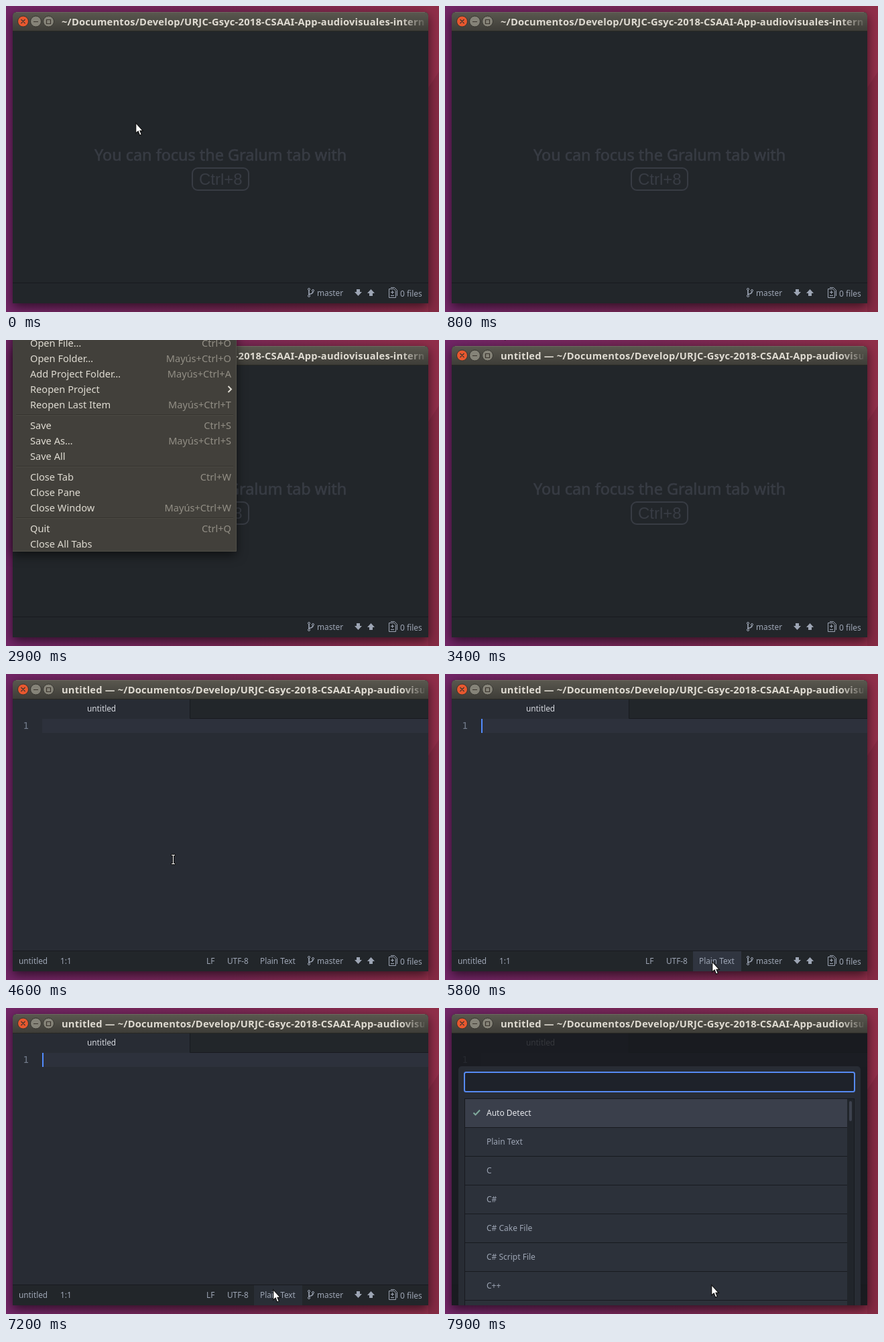
An HTML page for the animation above (8 s loop, 646 by 457 pixels).

```html
<!DOCTYPE html>
<html lang="en">
<head>
<meta charset="utf-8">
<title>New file and grammar selector</title>
<style>
html, body { margin: 0; width: 100%; height: 100%; overflow: hidden; background: #5d1f4c; }
svg { display: block; width: 100vw; height: 100vh; font: 11.8px "Noto Sans", "Open Sans", sans-serif; }
text { white-space: pre; }
.title { font-size: 14.7px; font-weight: 700; letter-spacing: .22px; fill: url(#titleFade); }
.menu { font-size: 14.6px; fill: #dfdbd2; }
.menu .keys { fill: #928e85; text-anchor: end; }
.status { fill: #9da5b4; }
.rows { font-size: 12px; fill: #9da5b4; }

/* One loop is 8 s, so 1.25% is a tenth of a second. */
.anim { animation: 8s step-end infinite; }
#menu { animation-name: menu; }
#pathTitle { animation-name: early; }
#fileTitle { animation-name: late; }
#welcome { animation-name: welcome; }
#editor { animation-name: editor; }
#caret { animation-name: caret; }
#hover { animation-name: hover; }
#dim { animation-name: dim; }
#panel { animation-name: panel; }
#pointer { animation-name: travel; }
#arrow { animation-name: arrow; }
#beam { animation-name: beam; }

@keyframes menu { 0%, 42.5% { visibility: hidden } 21.25% { visibility: visible } }
@keyframes early { 0% { visibility: visible } 42.5%, 100% { visibility: hidden } }
@keyframes late { 0% { visibility: hidden } 42.5%, 100% { visibility: visible } }
@keyframes welcome { 0% { visibility: visible } 43.75%, 100% { visibility: hidden } }
@keyframes editor { 0% { visibility: hidden } 43.75%, 100% { visibility: visible } }
@keyframes caret {
  0%, 47.5%, 57.5%, 67.5%, 77.5%, 87.5%, 92.5%, 100% { visibility: hidden }
  43.75%, 52.5%, 62.5%, 72.5%, 82.5%, 90% { visibility: visible }
}
@keyframes hover {
  0% { fill: transparent }
  65% { fill: #303540 }
  90%, 100% { fill: #292e36 }
}
@keyframes dim {
  0% { opacity: 0 }
  92.5% { opacity: 0; animation-timing-function: steps(4, start) }
  97.5%, 100% { opacity: .85 }
}
@keyframes panel {
  0% { opacity: 0 }
  92.5% { opacity: 0; animation-timing-function: steps(2, start) }
  95%, 100% { opacity: 1 }
}
@keyframes arrow { 0%, 65%, 100% { visibility: visible } 52.5% { visibility: hidden } }
@keyframes beam { 0%, 65%, 100% { visibility: hidden } 52.5% { visibility: visible } }
@keyframes travel {
  0% { transform: translate(194px, 175px) }
  3.75% { transform: translate(194px, 175px); animation-timing-function: steps(6, start) }
  11.25% { transform: translate(100px, -20px) }
  31.25% { transform: translate(60px, -11px); animation-timing-function: steps(5, start) }
  37.5% { transform: translate(84px, -18px) }
  50% { transform: translate(84px, -18px); animation-timing-function: steps(7, start) }
  58.75% { transform: translate(249px, 277px); animation-timing-function: steps(2, start) }
  61.25% { transform: translate(332px, 384px); animation-timing-function: steps(6, start) }
  68.75% { transform: translate(395px, 434px) }
  70% { transform: translate(395px, 434px); animation-timing-function: steps(3, start) }
  73.75% { transform: translate(399px, 430px); animation-timing-function: steps(3, start) }
  77.5% { transform: translate(404px, 437px); animation-timing-function: steps(3, start) }
  81.25% { transform: translate(409px, 429px); animation-timing-function: steps(4, start) }
  86.25% { transform: translate(401px, 421px) }
  87.5% { transform: translate(399px, 421px) }
  98.75%, 100% { transform: translate(398px, 414px) }
}
</style>
</head>
<body>
<svg viewBox="0 0 646 457" preserveAspectRatio="none">
  <defs>
    <linearGradient id="desktop">
      <stop stop-color="#712566"/><stop offset=".5" stop-color="#772754"/><stop offset="1" stop-color="#902e49"/>
    </linearGradient>
    <linearGradient id="bar" x2="0" y2="1">
      <stop stop-color="#5a584f"/><stop offset="1" stop-color="#3e3d38"/>
    </linearGradient>
    <linearGradient id="titleFade" gradientUnits="userSpaceOnUse" x1="588" x2="626" y1="0" y2="0">
      <stop stop-color="#dfdbd2"/><stop offset="1" stop-color="#dfdbd2" stop-opacity=".08"/>
    </linearGradient>
    <filter id="shadow" x="-20%" y="-20%" width="140%" height="140%">
      <feDropShadow dx="0" dy="5" stdDeviation="8" flood-opacity=".6"/>
    </filter>
    <clipPath id="window"><path d="M10 37H630V444H10Z"/></clipPath>
    <clipPath id="titleArea"><path d="M80 10H624V37H80Z"/></clipPath>
  </defs>

  <rect width="646" height="457" fill="url(#desktop)"/>
  <path d="M630 122L646 98V457H630Z" opacity=".08"/>
  <path d="M10 444V15Q10 9 16 9H624Q630 9 630 15V444Z" fill="#21252b" filter="url(#shadow)"/>

  <path d="M10 37V15Q10 9 16 9H624Q630 9 630 15V37Z" fill="url(#bar)"/>
  <path d="M15 9.5H625" stroke="#6b695f"/>
  <path d="M10 37.5H630" stroke="#282823"/>
  <g stroke="#34332e">
    <circle cx="25.500" cy="23" r="8" fill="#e8582f"/>
    <circle cx="44.500" cy="23" r="8" fill="#858378"/>
    <circle cx="63.500" cy="23" r="8" fill="#858378"/>
    <path d="M22.500 20L28.500 26M28.500 20L22.500 26M41 23.500H48M60.500 20.500H66.500V26.500H60.500Z" fill="none" stroke="#3a342e" stroke-width="1.200"/>
  </g>
  <g class="title" clip-path="url(#titleArea)">
    <text id="pathTitle" class="anim" x="83" y="29">~/Documentos/Develop/URJC-Gsyc-2018-CSAAI-App-audiovisuales-internet</text>
    <text id="fileTitle" class="anim" x="83" y="29">untitled — ~/Documentos/Develop/URJC-Gsyc-2018-CSAAI-App-audiovisuales</text>
  </g>

  <g id="welcome" class="anim" fill="#383c44" stroke="#383c44">
    <text x="132" y="231" font-size="23.400" font-weight="500" stroke-width=".6">You can focus the Gralum tab with</text>
    <rect x="278" y="242" width="84" height="33" rx="8" fill="none" stroke-width="2"/>
    <text x="288" y="267" font-size="24" font-family="Liberation Sans, Arial, sans-serif" stroke="none">Ctrl+8</text>
  </g>

  <path d="M10 413.500H630" stroke="#181a1f"/>

  <g id="editor" class="anim">
    <path d="M10 38H274V67H630V413H10Z" fill="#282c34"/>
    <path d="M274.500 38V66.500H630" fill="none" stroke="#181a1f"/>
    <path d="M54 67H630V88H54Z" fill="#2d313c"/>
    <text x="121" y="56" fill="#d7dae0">untitled</text>
    <text x="25.500" y="82" fill="#737c8c" font-size="14" font-family="DejaVu Sans Mono, monospace">1</text>
    <path id="caret" class="anim" d="M54 67H56V88H54Z" fill="#528bff"/>
    <path id="hover" class="anim" d="M370 414H442V444H370Z" fill="transparent"/>
    <g class="status">
      <text x="19" y="433">untitled</text>
      <text x="81" y="433">1:1</text>
      <text x="299" y="433">LF</text>
      <text x="330" y="433">UTF-8</text>
      <text x="379" y="433">Plain Text</text>
    </g>
  </g>

  <g class="status">
    <g fill="none" stroke="#9da5b4">
      <circle cx="452" cy="423" r="1.500"/><circle cx="452" cy="433" r="1.500"/><circle cx="458" cy="425" r="1.500"/>
      <path d="M452 424.500V431.500M458 426.500Q458 429.500 452.500 430.500" stroke-width="1.600"/>
      <path d="M571.500 422.500H578.500L581.500 425.500V435.500H571.500ZM574 420.500H579.500L583.500 424.500V433M576.500 425V430M574 427.500H579M574 432.500H579"/>
    </g>
    <path d="M523 423H528V427H531L525.500 433L520 427H523ZM542 433H547V429H550L544.500 423L539 429H542Z"/>
    <text x="464" y="433">master</text>
    <text x="588" y="434" font-size="12">0 files</text>
  </g>

  <g clip-path="url(#window)">
    <path id="dim" class="anim" d="M10 38H630V444H10Z" fill="#181a1f"/>
    <g id="panel" class="anim">
      <rect x="20" y="87" width="600" height="380" rx="5" fill="#282c34"/>
      <rect x="29" y="96" width="582" height="29" rx="2.500" fill="#1e222a" stroke="#568af2" stroke-width="2"/>
      <path d="M29 135H611V444H29Z" fill="#181a1f"/>
      <path d="M600 136H610V444H600Z" fill="#21252b"/>
      <rect x="603" y="139" width="4" height="30" rx="2" fill="#3d424e"/>
      <g id="rows" class="rows"></g>
      <path d="M42.500 156.500L45.500 159.500L52 152.500" fill="none" stroke="#7fa99b" stroke-width="2"/>
    </g>
  </g>

  <g id="menu" class="anim menu">
    <path d="M10 -30H343V316H10Z" fill="#42413b" filter="url(#shadow)"/>
    <path d="M343.500 0V315.500H10" fill="none" stroke="#504e47"/>
    <path d="M15 111.500H339M15 188.500H339M15 265.500H339" stroke="#35342f"/>
    <path d="M15 112.500H339M15 189.500H339M15 266.500H339" stroke="#4c4a43"/>
    <path d="M331.500 69L336 73.500L331.500 78" fill="none" stroke="#dfdbd2" stroke-width="2"/>
  </g>

  <g id="pointer" class="anim">
    <path id="arrow" class="anim" d="M-.3 -.3V15L3.200 12L5.500 18L8.300 17L6 11.300H10.300Z" fill="#fff" stroke="#111" stroke-width="1.200"/>
    <g id="beam" class="anim" fill="none">
      <path d="M-3 -6.500H4M.5 -7V7M-3 6.500H4" stroke="#111" stroke-width="3"/>
      <path d="M-2 -6.500H3M.5 -6V6M-2 6.500H3" stroke="#fff"/>
    </g>
  </g>
</svg>
<script>
function add(parent, tag, attrs, label = "") {
  const node = document.createElementNS("http://www.w3.org/2000/svg", tag);
  for (const name in attrs) node.setAttribute(name, attrs[name]);
  node.textContent = label;
  parent.append(node);
}

const menuGroups = [
  [10, "Open File…|Ctrl+O", "Open Folder…|Mayús+Ctrl+O", "Add Project Folder…|Mayús+Ctrl+A",
    "Reopen Project", "Reopen Last Item|Mayús+Ctrl+T"],
  [133, "Save|Ctrl+S", "Save As…|Mayús+Ctrl+S", "Save All"],
  [210, "Close Tab|Ctrl+W", "Close Pane", "Close Window|Mayús+Ctrl+W"],
  [287, "Quit|Ctrl+Q", "Close All Tabs"]
];
const menu = document.getElementById("menu");
for (const [top, ...items] of menuGroups) {
  items.forEach((item, i) => {
    const [label, keys] = item.split("|");
    const y = top + 23 * i;
    add(menu, "text", { x: 36, y }, label);
    if (keys) add(menu, "text", { x: 336, y, class: "keys" }, keys);
  });
}

const rows = document.getElementById("rows");
const grammars = ["Auto Detect", "Plain Text", "C", "C#", "C# Cake File", "C# Script File", "C++", ""];
grammars.forEach((label, i) => {
  const y = 136 + 43 * i;
  add(rows, "rect", { x: 30, y, width: 570, height: 42, fill: i ? "#2c313a" : "#3a3f4b" });
  add(rows, "text", { x: 62, y: y + 25, fill: i ? "#9da5b4" : "#e6e8ec" }, label);
});
</script>
</body>
</html>
```
